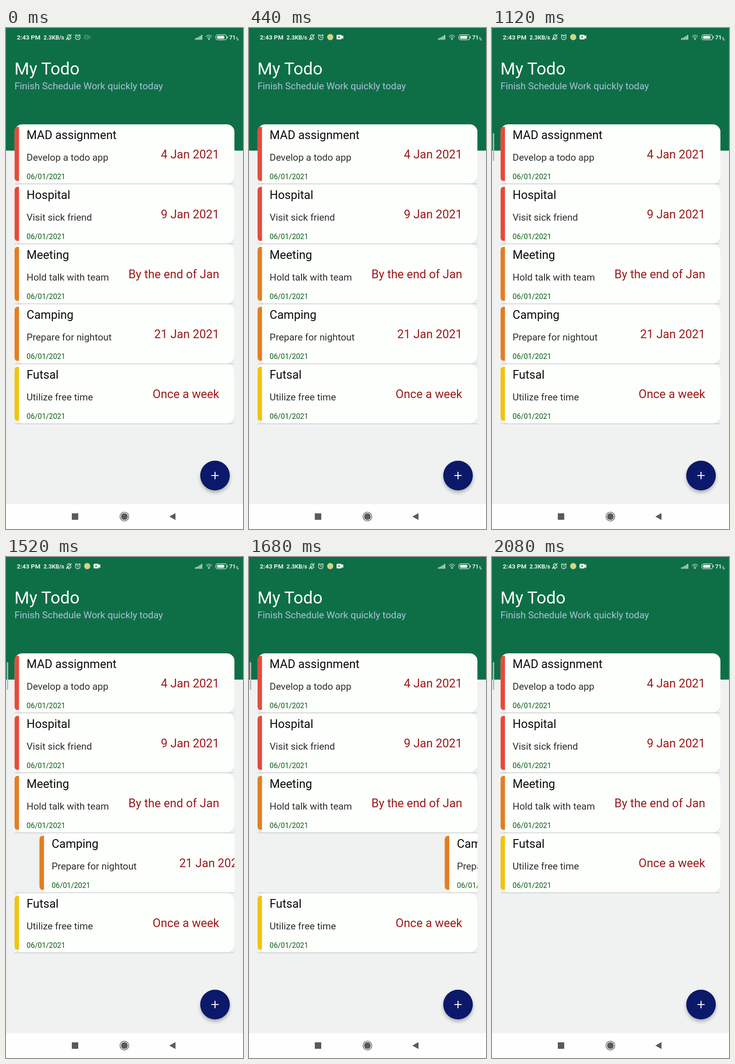
These frames come from a looping animation (515x1087 px, 2920 ms). An HTML page:

```html
<!DOCTYPE html>
<html lang="en">
<head>
<meta charset="utf-8">
<title>Todo list</title>
<style>
  html, body { margin: 0; width: 100%; height: 100%; overflow: hidden; background: #f0f2f1; }
  svg { display: block; width: 100%; height: 100%; font-family: Roboto, sans-serif; }
  .card { filter: drop-shadow(0 1px 1px #0002); }
  .title { font-size: 25.5px; fill: #0c0c0c; }
  .detail { font-size: 20.8px; fill: #2e2e2e; }
  .added { font-size: 15.8px; fill: #0a5a14; }
  .due { font-size: 25.6px; fill: #9c1a1c; text-anchor: end; }
  .status { font-weight: 700; fill: #e9f3ee; }
  .line { fill: none; stroke: #e2eee8; stroke-width: 1.3; }
</style>
</head>
<body>
<svg viewBox="0 0 515 1087">
  <defs>
    <clipPath id="rowClip"><rect x="18.4" y="0" width="478.2" height="131"/></clipPath>
    <filter id="soft" x="-50%" y="-50%" width="200%" height="200%"><feGaussianBlur stdDeviation="4"/></filter>
  </defs>
  <rect width="515" height="1087" fill="#f0f2f1"/>
  <rect width="515" height="266" fill="#0e6f46"/>

  <g class="status">
    <text x="23.5" y="25" font-size="13.6">2:43 PM</text>
    <text x="81.5" y="25" font-size="12.5">2.3KB/s</text>
    <text x="485" y="24.5" font-size="12.3">71</text>
    <text x="499.5" y="26.5" font-size="8.5">%</text>
  </g>
  <g class="line">
    <path d="M131 23.5h10M132.5 23q1-1 1-4q0-4 3.5-4.5q3 .5 3.5 4q0 3 1 4.5M135 25.5h3M130.5 26l12-12"/>
    <circle cx="156" cy="20.5" r="5"/>
    <path d="M156 17.5v3.2l2 1M150 16.5l3-2.8M162 16.5l-3-2.8"/>
    <rect x="456" y="14.7" width="23.5" height="11" rx="4"/>
    <path d="M481.2 18v4.5"/>
    <path d="M434.5 18.5q6.5-6 13 0" opacity=".75"/>
    <path d="M436.7 21.2q4.3-4 8.6 0" opacity=".75"/>
  </g>
  <path d="M438.7 23.3q2.3-2 4.6 0L441 26Z" fill="#e2eee8"/>
  <rect x="458.5" y="17" width="16" height="6.4" rx="2" fill="#e9f3ee"/>
  <path d="M411 25.5v-3h2v3zM414.3 25.5v-4.5h2v4.5zM417.6 25.5v-6.3h2v6.3zM420.9 25.5v-8.3h2v8.3zM424.2 25.5v-10.5h2v10.5z" fill="#e9f3ee"/>
  <circle id="notice" cx="176.5" cy="19.8" r="6.7" fill="#d3d487"/>
  <g id="camera">
    <path d="M-7-3.5q0-1.5 1.5-1.5h8q1.5 0 1.5 1.5v1.8l3.5-2.5v8.4l-3.5-2.5v1.8q0 1.5-1.5 1.5h-8q-1.5 0-1.5-1.5z" fill="#fff"/>
    <circle cx="-1.5" r="1.8" fill="#0e6f46"/>
  </g>

  <text x="18.2" y="101" font-size="37" fill="#fcfffd">My Todo</text>
  <text x="18.4" y="133" font-size="20.7" fill="#abc1dc">Finish Schedule Work quickly today</text>
  <rect id="handle" x="1.8" y="228" width="3" height="60.5" rx="1.5" fill="#b4bab7"/>
  <g id="list"></g>

  <circle cx="454.2" cy="976" r="31.5" fill="#000" opacity=".32" filter="url(#soft)"/>
  <circle cx="454.2" cy="971" r="32.2" fill="#0c196b"/>
  <path d="M446.2 971h16M454.2 963v16" stroke="#fff" stroke-width="2.2"/>

  <rect y="1033" width="515" height="54" fill="#fdfefd"/>
  <g fill="#595b5a">
    <rect x="143" y="1053" width="14" height="14"/>
    <circle cx="257.3" cy="1060" r="7.3"/>
    <circle cx="257.3" cy="1060" r="9.6" fill="none" stroke="#595b5a" stroke-width="1.4"/>
    <path d="M355 1060l13.3-7.4v14.8z"/>
  </g>
</svg>
<script>
const LOOP = 2920, STEP = 40, REMOVED_AT = 2000;
const TOP = 208.5, PITCH = 130.1;
const byId = id => document.getElementById(id);

const tasks = [
  ['MAD assignment', 'Develop a todo app', '4 Jan 2021', '#e64a3b'],
  ['Hospital', 'Visit sick friend', '9 Jan 2021', '#e64a3b'],
  ['Meeting', 'Hold talk with team', 'By the end of Jan', '#e47e22'],
  ['Camping', 'Prepare for nightout', '21 Jan 2021', '#e47e22'],
  ['Futsal', 'Utilize free time', 'Once a week', '#f0c40f'],
];

byId('list').innerHTML = tasks.map(([title, detail, due, color]) => `
  <g class="row"><g clip-path="url(#rowClip)">
    <g class="card">
      <rect x="18.4" y=".4" width="478.2" height="128.6" rx="17" fill="#fdfffc"/>
      <path d="M28.2 6v117.4h-1.8q-8 0-8-9v-99.4q0-9 8-9z" fill="${color}"/>
      <text class="title" x="44.8" y="32.5">${title}</text>
      <text class="detail" x="44.8" y="79.3">${detail}</text>
      <text class="added" x="44.8" y="119.3">06/01/2021</text>
      <text class="due" x="463.3" y="74.4">${due}</text>
    </g>
    <rect x="18.4" y="129.2" width="478.2" height="1.3" fill="#c9cbca"/>
  </g></g>`).join('');

const rows = [...document.querySelectorAll('.row')];
const swiped = rows[3], swipedCard = swiped.querySelector('.card');

const progress = (t, from, to) => Math.min(1, Math.max(0, (t - from) / (to - from)));
const easeCubic = u => u < .5 ? 4 * u ** 3 : 1 - 4 * (1 - u) ** 3;
const easeSine = u => .5 - .5 * Math.cos(Math.PI * u);

// The finger drags the card most of the way, then it settles off the list.
const swipeOffset = t =>
  407 * easeCubic(progress(t, 1444, 1680)) + 72 * easeSine(progress(t, 1700, 1950));

function draw(t) {
  const arrive = easeSine(progress(t, 0, 400));
  byId('camera').setAttribute('transform', `translate(${176.3 + 21 * arrive} 19.8)`);
  byId('camera').setAttribute('opacity', .18 + .82 * arrive);
  byId('notice').setAttribute('opacity', arrive);
  byId('handle').setAttribute('opacity', progress(t, 640, 900));

  const removed = t >= REMOVED_AT;
  swiped.setAttribute('visibility', removed ? 'hidden' : 'visible');
  swipedCard.setAttribute('transform', `translate(${swipeOffset(t)} 0)`);
  rows.forEach((row, i) => {
    const slot = removed && i > 3 ? i - 1 : i;
    row.setAttribute('transform', `translate(0 ${TOP + slot * PITCH})`);
  });
}

const start = performance.now();
function tick() {
  const elapsed = (performance.now() - start) % LOOP;
  draw(Math.floor(elapsed / STEP) * STEP);
  requestAnimationFrame(tick);
}
tick();
</script>
</body>
</html>
```
